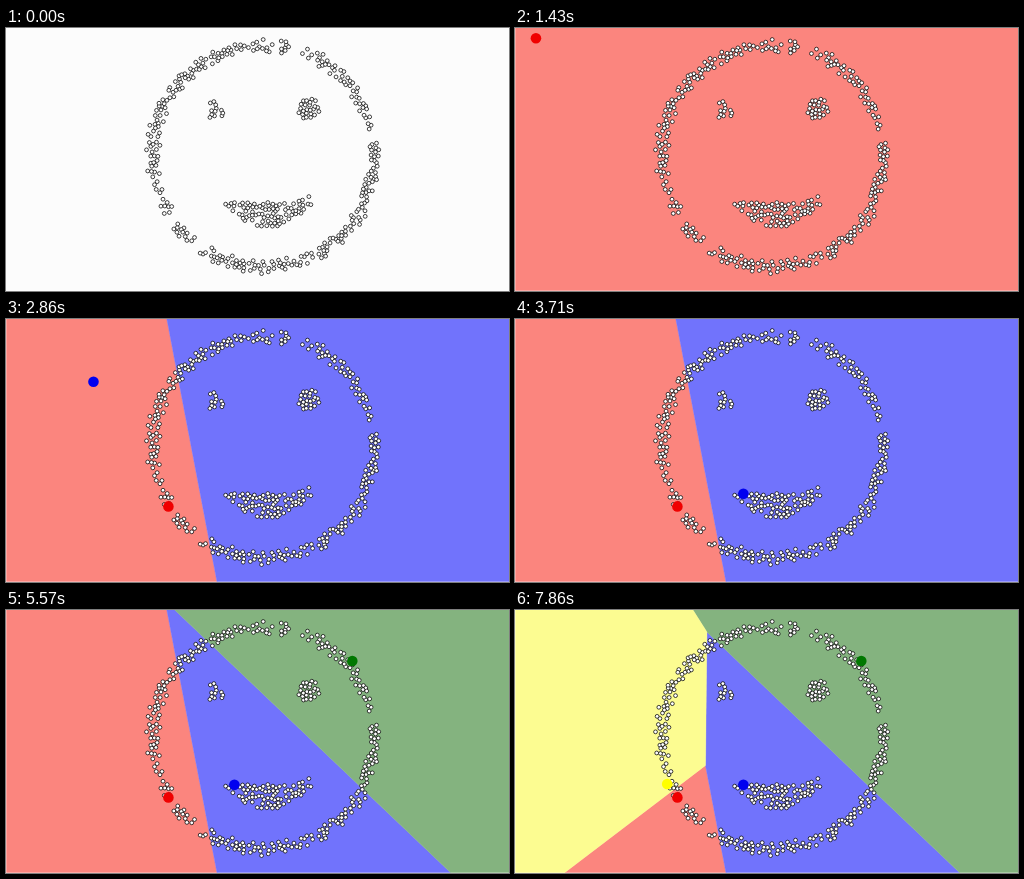
An HTML page with a canvas that plays this animation: 503x263 px, repeating every 8 s.

```html
<!DOCTYPE html>
<html lang="en">
<head>
<meta charset="utf-8">
<title>Smiley clusters</title>
<style>
  html, body { margin: 0; width: 100%; height: 100%; overflow: hidden; background: #fcfcfc; }
  canvas { display: block; }
</style>
</head>
<body>
<canvas id="stage" width="503" height="263"></canvas>
<script>
const W = 503, H = 263, LOOP = 8000, STEP = 1000 / 7, FLIGHT = 250;
const ctx = document.getElementById('stage').getContext('2d');

// every centre flies in from the same spot, its area appears at once
const origin = [20, 9];
const sites = [
  { dot: '#f00000', area: '#fb857e', to: [162.4, 187.4], start: 1399 },
  { dot: '#0000f0', area: '#7173fc', to: [228.4, 174.8], start: 2749 },
  { dot: '#007800', area: '#84b37f', to: [346.3, 51], start: 3762 },
  { dot: '#ffff00', area: '#fcfc91', to: [152.2, 174], start: 5931 }
];

let seed = 11;
const random = () => (seed = (seed * 16807) % 2147483647) / 2147483647;
const spread = (a, b) => a + (b - a) * random();
const points = [];

// add n random points that do not sit on top of each other
function scatter(n, pick) {
  for (let tries = 0; n > 0 && tries < 5000; tries++) {
    const [x, y] = pick();
    if (points.some(p => Math.hypot(p[0] - x, p[1] - y) < 2.8)) continue;
    points.push([x, y]);
    n--;
  }
}

function polar(x, y, r, angle) {
  return [x + r * Math.cos(angle), y + r * Math.sin(angle)];
}

const disc = (x, y, r) => () => polar(x, y, r * Math.sqrt(random()), spread(0, 2 * Math.PI));

function outline() {
  const gaps = [-74, -11, 127, 146];
  let degrees;
  do degrees = spread(-180, 180); while (gaps.some(g => Math.abs(g - degrees) < 3));
  return polar(257.5, 128, 111 + (random() + random() - 1) * 7.5, degrees * Math.PI / 180);
}

function mouth() {
  const x = spread(219, 305);
  const top = 174.5 - Math.max(0, x - 290) * 0.6;
  return [x, spread(top, Math.max(top + 2, 199 - (x - 262) ** 2 / 85))];
}

scatter(325, outline);
scatter(12, disc(211, 83, 11));
scatter(24, disc(303, 80.5, 11));
scatter(82, mouth);

// keep the part of a polygon that is nearer to p than to q
function clip(poly, p, q) {
  const side = v => (v[0] - (p[0] + q[0]) / 2) * (q[0] - p[0]) + (v[1] - (p[1] + q[1]) / 2) * (q[1] - p[1]);
  return poly.flatMap((a, i) => {
    const b = poly[(i + 1) % poly.length], da = side(a), db = side(b);
    const kept = da <= 0 ? [a] : [];
    if (da * db < 0) {
      const k = da / (da - db);
      kept.push([a[0] + (b[0] - a[0]) * k, a[1] + (b[1] - a[1]) * k]);
    }
    return kept;
  });
}

function cell(site, shown) {
  const stage = [[0.5, 0], [W, 0], [W, H - 0.5], [0.5, H - 0.5]];
  return shown.reduce((poly, other) => other === site ? poly : clip(poly, site.to, other.to), stage);
}

const cubicInOut = t => t < 0.5 ? 4 * t ** 3 : 1 - 4 * (1 - t) ** 3;

function circle(x, y, r) {
  ctx.beginPath();
  ctx.arc(x, y, r, 0, 2 * Math.PI);
}

function draw(time) {
  ctx.fillStyle = '#fcfcfc';
  ctx.fillRect(0, 0, W, H);

  const shown = sites.filter(s => time >= s.start);
  for (const site of shown) {
    ctx.fillStyle = ctx.strokeStyle = site.area;
    ctx.lineWidth = 0.4;
    ctx.beginPath();
    cell(site, shown).forEach(v => ctx.lineTo(...v));
    ctx.closePath();
    ctx.fill();
    ctx.stroke();
  }

  ctx.fillStyle = '#fff';
  ctx.strokeStyle = '#000';
  ctx.lineWidth = 0.75;
  for (const [x, y] of points) {
    circle(x, y, 1.9);
    ctx.fill();
    ctx.stroke();
  }

  for (const { dot, to, start } of shown) {
    const k = cubicInOut(Math.min(1, (time - start) / FLIGHT));
    const [x, y] = origin.map((from, i) => from + (to[i] - from) * k);
    ctx.fillStyle = dot;
    circle(x, y, 5.3);
    ctx.fill();
  }
}

const begin = performance.now();
function tick() {
  const time = (performance.now() - begin) % LOOP;
  draw(Math.floor((time + 4) / STEP) * STEP);
  requestAnimationFrame(tick);
}
tick();
</script>
</body>
</html>
```
